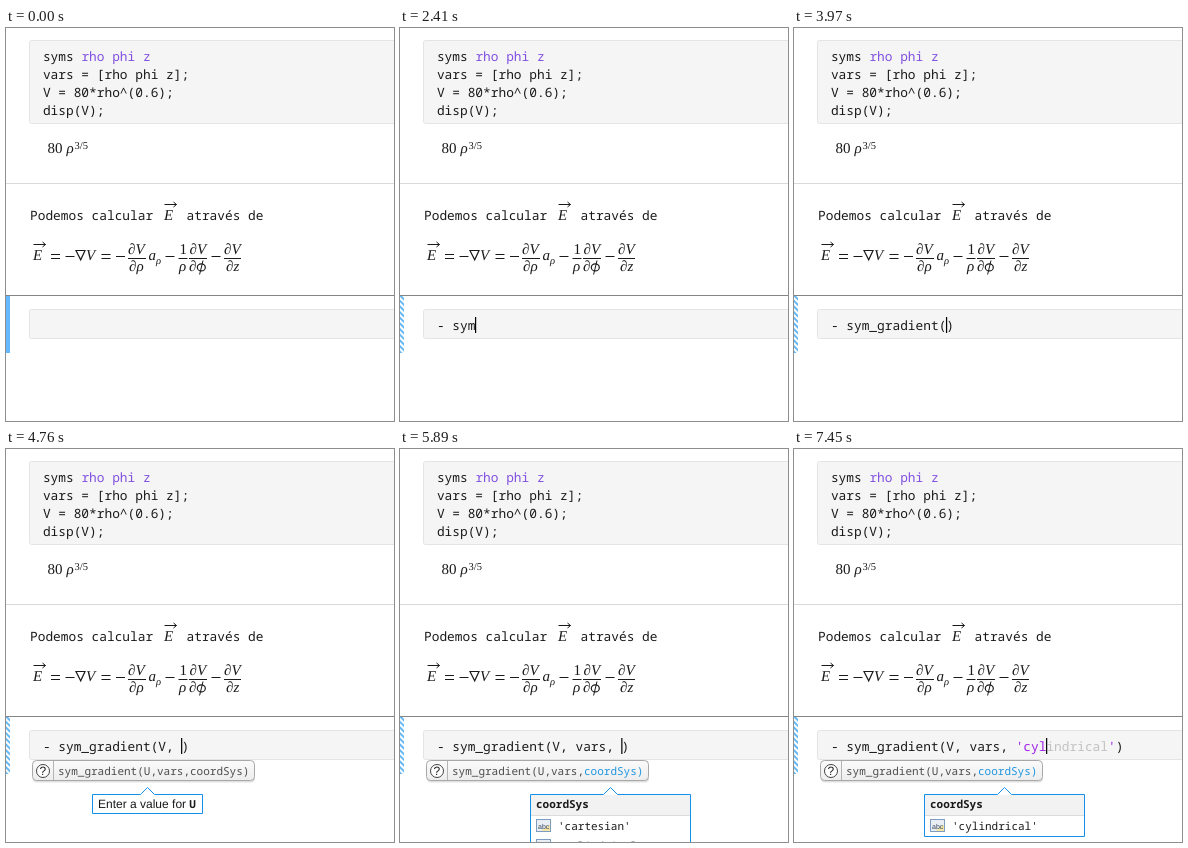
These frames come from a looping animation (388 by 393 pixels, 8 s). An HTML page:

```html
<!DOCTYPE html>
<html lang="pt">
<head>
<meta charset="utf-8">
<title>Live script</title>
<style>
html, body { margin: 0; width: 100%; height: 100%; overflow: hidden; background: #fff; }
svg { display: block; width: 388px; height: 393px; }
text { white-space: pre; text-rendering: geometricPrecision; }
.code { font: 12.83px "Noto Sans Mono", "DejaVu Sans Mono", monospace; fill: #1a1a1a; }
.small { font: 11px "Noto Sans Mono", "DejaVu Sans Mono", monospace; fill: #4d4d4d; }
.dark { fill: #1a1a1a; }
.bold { font-weight: 700; }
.label { font: 12px "Liberation Sans", Arial, sans-serif; fill: #1a1a1a; }
.math { font: italic 15px "Liberation Serif", "DejaVu Serif", serif; fill: #1a1a1a; }
.math .up { font-style: normal; }
.math .sub { font-size: 10.5px; }
.lines { fill: none; stroke: #1a1a1a; stroke-width: 1; }
.keyword { fill: #8050e0; }
.string { fill: #a020e8; }
.ghost { fill: #c2c2c2; }
.active { fill: #1e96e0; }
.cell { fill: #f5f5f5; stroke: #e4e4e4; }
.panel { fill: #fff; stroke: #1590e8; }
</style>
</head>
<body>
<svg viewBox="0 0 388 393">
  <defs>
    <pattern id="hatch" width="4" height="4" patternUnits="userSpaceOnUse" patternTransform="rotate(45)">
      <rect width="4" height="4" fill="#fff"/>
      <rect width="4" height="2" fill="#66b8f5"/>
    </pattern>
    <linearGradient id="hintFill" x2="0" y2="1">
      <stop stop-color="#fbfbfb"/><stop offset="1" stop-color="#ededed"/>
    </linearGradient>
    <g id="vector">
      <text class="math" x="0" y="0">E</text>
      <path class="lines" d="M.5-15.5h12m-3-2.5l3 2.5l-3 2.5"/>
    </g>
  </defs>

  <rect class="cell" x="23.5" y="12.5" width="380" height="83" rx="2"/>
  <g class="code">
    <text x="36.9" y="33">syms <tspan class="keyword">rho phi z</tspan></text>
    <text x="36.9" y="51">vars = [rho phi z];</text>
    <text x="36.9" y="69">V = 80*rho^(0.6);</text>
    <text x="36.9" y="87">disp(V);</text>
    <text x="24" y="192">Podemos calcular</text>
    <text x="180.5" y="192">através de</text>
  </g>
  <g class="math">
    <text class="up" x="41.5" y="125">80</text>
    <text x="60.5" y="125">ρ</text>
    <text class="up sub" x="68.5" y="120.5">3/5</text>
  </g>
  <path stroke="#d9d9d9" d="M0 155.5H388"/>
  <use href="#vector" x="158" y="192"/>

  <use href="#vector" x="27" y="232"/>
  <g class="math">
    <text x="80" y="232">V</text>
    <text x="122" y="226">∂V</text><text x="123" y="243">∂ρ</text>
    <text x="142.5" y="232">a</text><text class="sub" x="150" y="236">ρ</text>
    <text class="up" x="173.5" y="226">1</text><text x="173" y="243">ρ</text>
    <text x="183.5" y="226">∂V</text><text x="183" y="243">∂</text>
    <text x="218" y="226">∂V</text><text x="220" y="243">∂z</text>
  </g>
  <g class="lines">
    <path d="M45 226.5h9m-9 4h9M95.5 226.5h9m-9 4h9"/>
    <path d="M59.5 228.5h9M110 228.5h9M159.5 228.5h9M205.5 228.5h9"/>
    <path d="M122 230.5h18M172.5 230.5h9M183 230.5h18M218 230.5h17"/>
    <path stroke-width="1.2" d="M70 222.5h9l-4.3 9.3z"/>
    <ellipse cx="195.3" cy="239.4" rx="4" ry="3.5" stroke-width="1.2"/>
    <path d="M197 232.5l-3.4 14"/>
  </g>

  <path stroke="#858585" d="M0 267.5H388"/>
  <rect id="bar" y="268" width="4" height="57"/>
  <rect class="cell" x="23.5" y="281.5" width="380" height="29" rx="2"/>
  <text id="line" class="code" x="36.9" y="302"></text>
  <rect id="caret" y="289" width="1.2" height="16"/>
  <g id="popups"></g>
</svg>
<script>
const LOOP = 8000, LEFT = 36.9, ADVANCE = 7.698;
const el = id => document.getElementById(id);
const typed = "- sym_gradient(V, vars, 'cyl";
const upTo = n => typed.slice(0, n);

// Each step overrides only what changes from the step before it.
const steps = [
  [0, { code: "", ghost: "", tail: "", caret: false, stale: false }],
  [550, { code: upTo(1), caret: true }],
  [600, { stale: true }],
  [1210, { caret: false }],
  [1440, { code: upTo(2), caret: true }],
  [2030, { code: upTo(3) }],
  [2220, { code: upTo(4) }],
  [2410, { code: upTo(5) }],
  [2640, { code: upTo(6) }],
  [2850, { code: upTo(7) }],
  [3050, { code: upTo(8) }],
  [3150, { code: upTo(9) }],
  [3430, { code: upTo(10), complete: true }],
  [3740, { code: upTo(14), complete: false }],
  [3970, { code: upTo(15), tail: ")" }],
  [4120, { code: upTo(16), hint: "U", tip: "U" }],
  [4530, { code: upTo(17) }],
  [4640, { hint: "none" }],
  [4760, { code: upTo(18) }],
  [4940, { hint: "vars", tip: "vars" }],
  [5060, { code: upTo(19) }],
  [5190, { code: upTo(20) }],
  [5330, { code: upTo(21) }],
  [5470, { code: upTo(22) }],
  [5560, { code: upTo(23) }],
  [5660, { code: upTo(24) }],
  [5850, { hint: "coordSys", tip: "", menu: ["cartesian", "cylindrical"] }],
  [6100, { code: upTo(25), tail: "')" }],
  [6300, { ghost: "cartesian" }],
  [6480, { code: upTo(26), ghost: "artesian" }],
  [6630, { code: upTo(27), ghost: "" }],
  [6810, { ghost: "lindrical", menu: ["cylindrical"] }],
  [7370, { caret: false }],
  [7450, { code: upTo(28), ghost: "indrical", caret: true }]
];
const states = [];
for (const [at, change] of steps) states.push({ ...states.at(-1), ...change, at });

const span = (cls, text) => text ? `<tspan class="${cls}">${text}</tspan>` : "";
const text = (cls, x, y, body) => `<text class="${cls}" x="${x}" y="${y}">${body}</text>`;

// White box with a pointer in the middle of its top edge.
const callout = (x, width, height) => {
  const mid = x + width / 2;
  return `<path class="panel" d="M${x} 345.5H${mid - 7}l7-7l7 7H${x + width}v${height}H${x}z"/>`;
};

function hintBox(active) {
  const args = ["U", "vars", "coordSys"].map(a => a === active ? span("active", a) : a);
  const closing = active === "coordSys" ? span("active", ")") : ")";
  return `<rect x="27" y="313.5" width="222" height="20" rx="4" fill="#000" opacity=".12"/>
    <rect x="26.5" y="311.5" width="222" height="20" rx="4" fill="url(#hintFill)" stroke="#a8a8a8"/>
    <path stroke="#b4b4b4" d="M47.5 312v19"/>
    <circle cx="37" cy="322" r="6.5" fill="#fff" stroke="#444"/>
    ${text("label bold", 33.4, 326, "?")}
    ${text("small", 52, 326, `sym_gradient(${args}${closing}`)}`;
}

function tipBox(name) {
  const [x, width] = name === "U" ? [86.5, 110] : [99.5, 130];
  return callout(x, width, 19) + text("label", x + 5.5, 359, "Enter a value for ")
    + text("small dark bold", x + 96.8, 359, name);
}

function menuBox(items) {
  const rows = items.map((item, i) => {
    const y = 370.5 + i * 20;
    return `<rect x="136.5" y="${y}" width="14" height="12" fill="#e9eef5" stroke="#7c9cc0"/>
      <path fill="#f5e6a8" d="M150 ${y + 5}v6.5h-9z"/>
      <text x="138" y="${y + 9}" font-size="7" font-family="Liberation Sans, sans-serif" fill="#345">abc</text>`
      + text("small dark", 158, y + 10, `'${item}'`);
  });
  return callout(130.5, 160, 22 + 20 * items.length)
    + `<rect x="131" y="346" width="159" height="20" fill="#f2f2f2"/><path stroke="#dcdcdc" d="M131 366.5h159"/>`
    + text("small dark bold", 136, 359, "coordSys") + rows.join("");
}

const completion = () =>
  `<rect x="24.5" y="311.5" width="162" height="27" fill="#fff" stroke="#b4b4b4"/>
   <rect x="26" y="315" width="159" height="20" fill="#e5f2fc"/>`
  + text("math", 32, 329, "fx") + text("small dark", 52, 329, "sym_gradient");

function show(s) {
  const quote = s.code.indexOf("'");
  const cut = quote < 0 ? s.code.length : quote;
  const closing = s.tail.length > 1 ? "'" : "";
  el("line").innerHTML = s.code.slice(0, cut) + span("string", s.code.slice(cut))
    + span("ghost", s.ghost) + span("string", closing) + s.tail.slice(closing.length);
  el("caret").setAttribute("x", LEFT + s.code.length * ADVANCE - 0.4);
  el("caret").style.display = s.caret ? "" : "none";
  el("bar").setAttribute("fill", s.stale ? "url(#hatch)" : "#66b8ff");
  el("popups").innerHTML = (s.complete ? completion() : "") + (s.hint ? hintBox(s.hint) : "")
    + (s.tip ? tipBox(s.tip) : "") + (s.menu ? menuBox(s.menu) : "");
}

let start, current;
function frame(now) {
  start ??= now;
  const time = (now - start) % LOOP;
  const next = states.findLast(s => s.at <= time);
  if (next !== current) show(current = next);
  requestAnimationFrame(frame);
}
show(current = states[0]);
requestAnimationFrame(frame);
</script>
</body>
</html>
```
